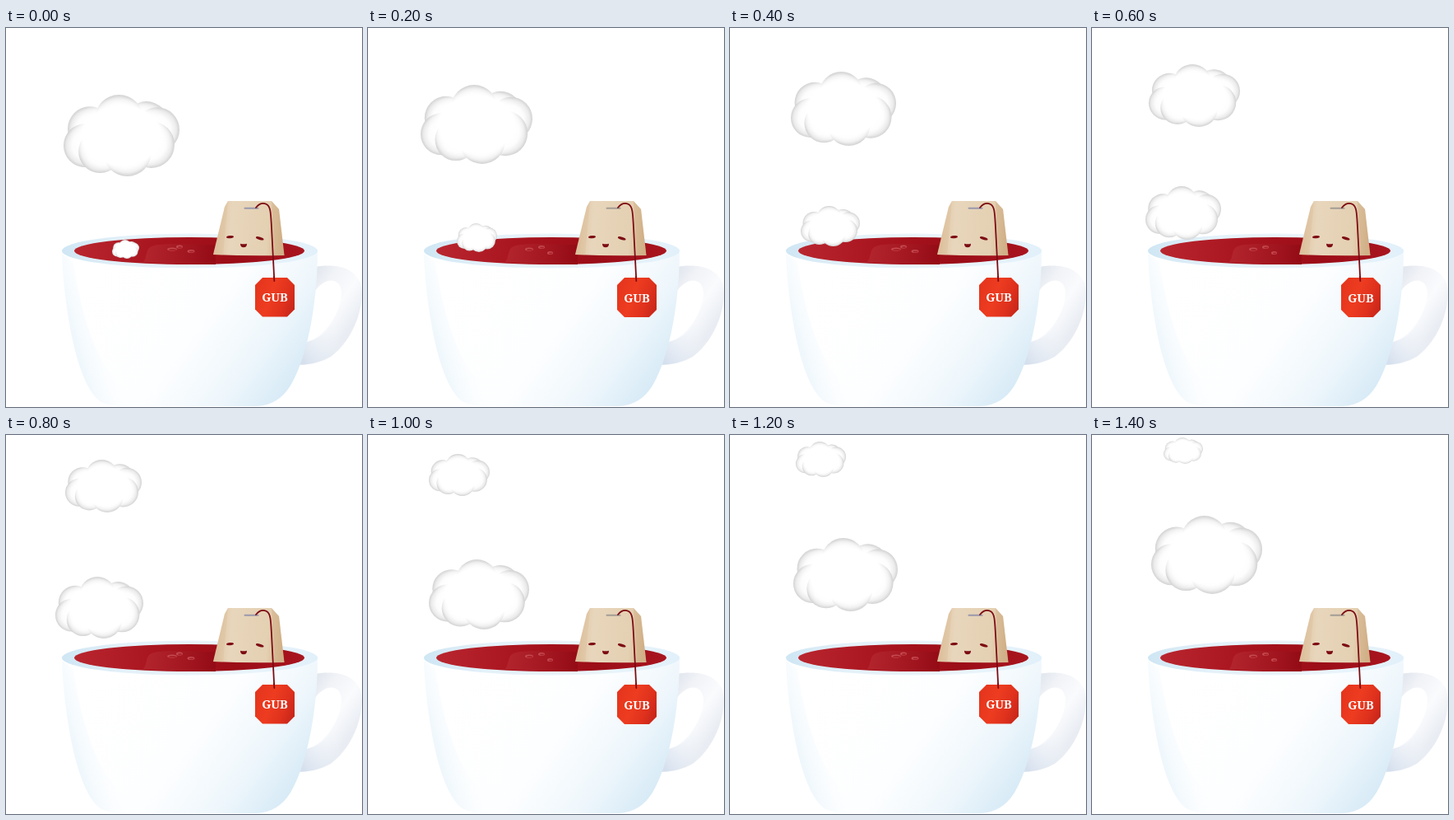
An HTML page with a canvas for the animation above (1600 ms loop, 433 px wide and 460 px high).

```html
<!DOCTYPE html>
<html lang="en">
<head>
<meta charset="utf-8">
<title>Tea time</title>
<style>
html, body { margin: 0; width: 100%; height: 100%; overflow: hidden; background: #fff; }
canvas { display: block; }
</style>
</head>
<body>
<canvas id="stage" width="433" height="460"></canvas>
<script>
const ctx = document.getElementById('stage').getContext('2d');
const STEP = 200, STEPS = 8;

// Steam path: left, top, right, bottom for each step of a puff's two-loop life
const STEAM = [
  [129, 257, 162, 280], [108, 237, 157, 272], [86, 216, 158, 265], [65, 192, 157, 257],
  [60, 172, 167, 247], [74, 151, 196, 236], [77, 125, 204, 214], [72, 98, 207, 193],
  [70, 81, 211, 180], [64, 69, 200, 165], [74, 53, 202, 143], [69, 44, 180, 120],
  [72, 30, 165, 94], [74, 23, 148, 74], [80, 8, 141, 51], [87, 3, 135, 35]
];
// Lobes of one cloud: x, y, radius
const LOBES = [
  [-38, -8, 27], [30, -14, 27], [-3, -20, 29], [43, -7, 27],
  [-44, 12, 26], [36, 11, 28], [-26, 19, 26], [7, 20, 29]
];

function linear(x0, y0, x1, y1, ...stops) {
  const g = ctx.createLinearGradient(x0, y0, x1, y1);
  stops.forEach(([at, color]) => g.addColorStop(at, color));
  return g;
}

function radial(x, y, r, ...stops) {
  const g = ctx.createRadialGradient(x, y, 0, x, y, r);
  stops.forEach(([at, color]) => g.addColorStop(at, color));
  return g;
}

function fill(path, style) {
  ctx.fillStyle = style;
  ctx.fill(new Path2D(path));
}

function line(path, style, width) {
  ctx.strokeStyle = style;
  ctx.lineWidth = width;
  ctx.lineCap = 'round';
  ctx.stroke(new Path2D(path));
}

function ellipse(x, y, rx, ry, style, turn = 0) {
  ctx.fillStyle = style;
  ctx.beginPath();
  ctx.ellipse(x, y, rx, ry, turn, 0, Math.PI * 2);
  ctx.fill();
}

function drawHandle() {
  fill('M374 290 C399 286 422 289 431 309 C438 340 421 380 395 399 Q379 409 355 409 ' +
       'L364 382 C390 375 408 343 408 321 C407 302 388 302 376 319 Z',
    linear(368, 300, 432, 345, [0, '#dfe4ec'], [0.3, '#f1f3f7'], [0.65, '#fafbfd'], [1, '#e9edf3']));
  fill('M366 381 Q385 376 396 360 L412 383 Q390 409 355 409 Z',
    linear(358, 400, 408, 372, [0, 'rgba(207,219,235,.85)'], [1, 'rgba(240,244,250,0)']));
}

function drawCup() {
  fill('M68 270 C68 325 82 425 113 452 Q122 459 145 459 L305 459 ' +
       'Q331 458 346 434 C369 395 379 325 379 270 Z',
    linear(115, 275, 350, 450, [0, '#fff'], [0.5, '#fdfeff'], [0.75, '#eff7fc'], [1, '#d3e8f5']));
  fill('M68 274 C70 325 82 425 113 452 Q122 459 145 459 L180 459 C120 440 95 370 82 284 Z',
    linear(70, 365, 124, 350, [0, 'rgba(226,241,250,.75)'], [1, 'rgba(255,255,255,0)']));
  ellipse(223.5, 270.5, 155.5, 21,
    linear(68, 270, 379, 270, [0, '#cfe6f4'], [0.25, '#e4f1f9'], [0.65, '#ebf5fb'], [1, '#e1f0fa']));
}

function drawTea(odd) {
  ellipse(223, 270.5, 140, 16.5,
    linear(83, 262, 363, 278, [0, '#b9262f'], [0.35, '#a9151f'], [0.7, '#9b0d17'], [1, '#a9151f']));
  fill('M167 284 C173 277 168 267 180 264 C197 260 230 263 255 263 L255 287 Q205 287 167 284 Z',
    linear(168, 270, 255, 278, [0, '#b3252d'], [0.6, '#a21620'], [1, '#940b15']));
  const spots = odd ? [[196, 268.5, 5], [211, 266, 4], [221.5, 273, 3.5]]
                    : [[202, 268.5, 6], [211, 265.5, 4], [225, 271, 4.5]];
  for (const [x, y, r] of spots) {
    ellipse(x, y, r, 2, '#c34a50');
    ellipse(x + 0.6, y + 0.5, r - 1.4, 1.1, '#ad2029');
  }
}

function drawCloud([left, top, right, bottom]) {
  ctx.save();
  ctx.translate((left + right) / 2, (top + bottom) / 2);
  ctx.scale((right - left) / 140, (bottom - top) / 98);
  for (const [x, y, r] of LOBES) {
    ellipse(x, y, r, r, radial(x, y, r, [0, '#fff'], [0.6, '#fcfcfc'], [0.85, '#ececec'], [1, '#d2d2d2']));
  }
  ctx.scale(1.35, 1);
  ellipse(0, 0, 46, 46, radial(0, 0, 46, [0, '#fff'], [0.76, '#fff'], [1, 'rgba(255,255,255,0)']));
  ctx.restore();
}

function drawBag(odd) {
  fill('M270 210 L323 210 L332 220 L338.5 276 Q295 277 252 275 L266 217 Z',
    linear(256, 240, 336, 246, [0, '#dfc5a2'], [0.22, '#e8d6bc'], [0.78, '#e4d0b2'], [1, '#d5b78f']));
  fill('M323 210 L332 220 L338.5 276 L327 276 Z', 'rgba(197,160,116,.3)');
  fill('M270 210 L266 217 L252 275 L264 276 Z', 'rgba(207,174,132,.22)');

  const ink = '#7d0b13';
  ellipse(272.5, 253.7, 4.5, 1.6, ink, -0.08);
  ellipse(308.7, 255.3, 5, 1.7, ink, 0.28);
  fill('M285 261.7 Q289 263 293 261.7 Q293 266.2 289 266.2 Q285 266.2 285 261.7 Z', ink);

  line('M290.5 218.7 H306.5', odd ? '#a39d95' : '#9a98ad', 2);
  line('M304 218 C308 213 313 212 317 214 C322 217 322 225 323 242 L326.3 306', ink, 1.8);
}

function drawTag(odd) {
  const end = odd ? 351 : 350.4;
  fill(`M312 303 H342 L351 312 V${end - 9} L342 ${end} H312 L303 ${end - 9} V312 Z`,
    linear(303, 318, 351, 336, [0, '#e5351d'], [0.4, '#ed3c20'], [0.75, '#df311d'], [1, '#c9271b']));
  line('M326 302 L326.3 307', '#7d0b13', 1.8);
  ctx.fillStyle = '#fff';
  ctx.font = 'bold 14.5px "Noto Serif", serif';
  ctx.textAlign = 'center';
  ctx.textBaseline = 'alphabetic';
  ctx.fillText('GUB', 327, odd ? 332.5 : 332);
}

function draw(now) {
  const step = Math.floor(now / STEP) % STEPS;
  const odd = step % 2 === 1;
  ctx.fillStyle = '#fff';
  ctx.fillRect(0, 0, 433, 460);
  drawHandle();
  drawCup();
  drawTea(odd);
  drawCloud(STEAM[step]);
  drawCloud(STEAM[step + STEPS]);
  drawBag(odd);
  drawTag(odd);
}

const start = performance.now();
function tick() {
  draw(performance.now() - start);
  requestAnimationFrame(tick);
}
tick();
</script>
</body>
</html>
```
